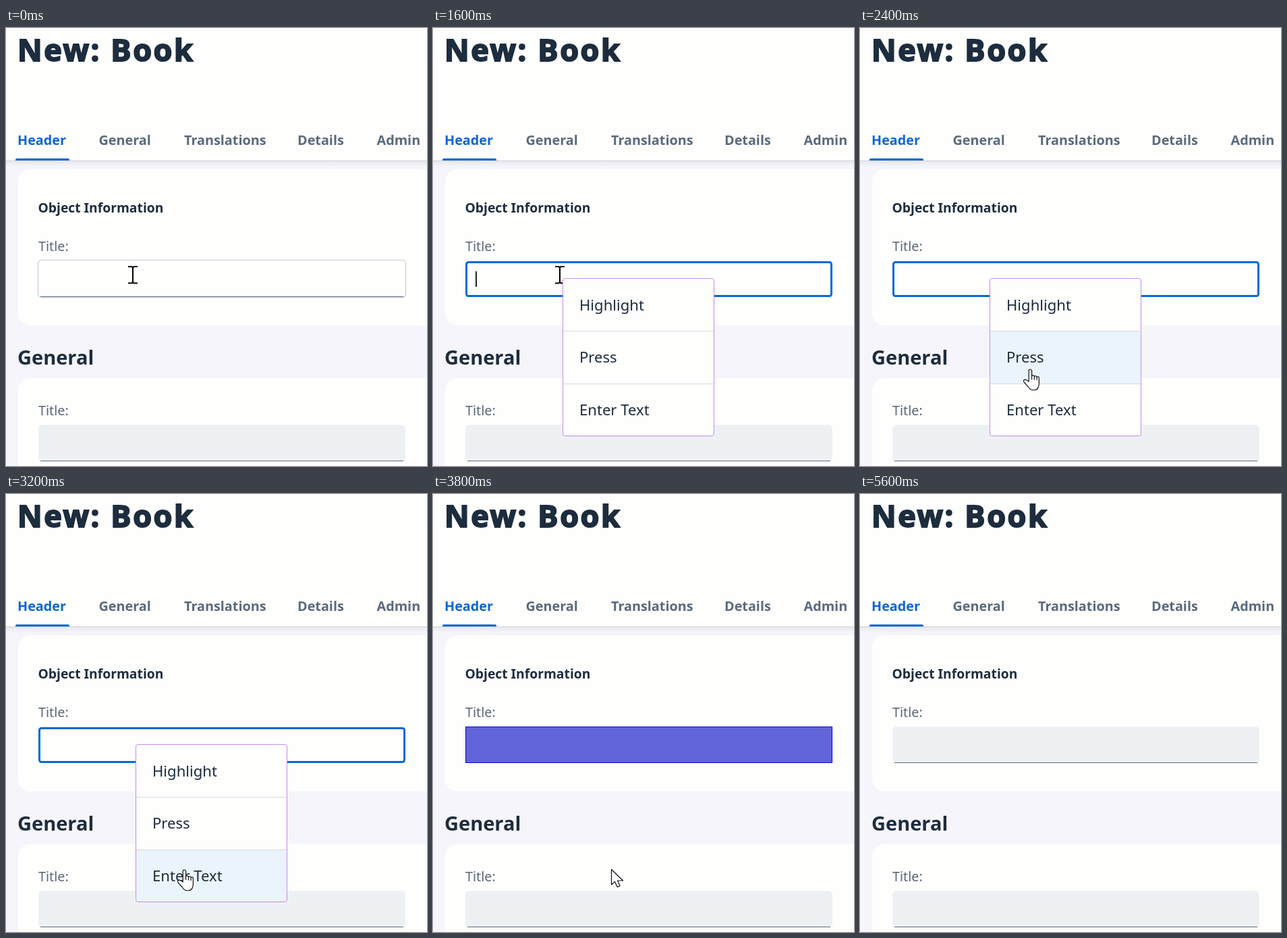
Recreate the animation shown at these times as an HTML page. Size 624 px wide and 648 px high, loop 6200 ms.

```html
<!DOCTYPE html>
<html lang="en">
<head>
<meta charset="utf-8">
<title>New: Book</title>
<style>
  html, body { margin: 0; width: 100%; height: 100%; overflow: hidden; background: #fefefd; }
  svg { display: block; width: 624px; height: 648px; }
  text { font-family: "Noto Sans", "Open Sans", sans-serif; fill: #1d2d3e; white-space: pre; }
  .title { font-size: 45px; font-weight: 700; letter-spacing: 2.6px; stroke: #1d2d3e; stroke-width: 2px; }
  .tab { font-size: 19.8px; font-weight: 700; fill: #5a6a7c; }
  .tab.on { fill: #0d65d8; }
  .h2 { font-size: 29px; font-weight: 700; }
  .h3 { font-size: 19.3px; font-weight: 700; }
  .label { font-size: 19.8px; fill: #5c6878; }
  .item { font-size: 22.1px; }
  .card { fill: #fefefd; }
  .cursor { fill: #fff; stroke: #111; stroke-width: 1.2px; stroke-linejoin: round; }
  [hidden] { display: none; }
</style>
</head>
<body>
<svg viewBox="0 0 624 648">
  <defs>
    <linearGradient id="shade" x2="0" y2="1">
      <stop stop-color="#e6e7ec"/>
      <stop offset="1" stop-color="#f5f5fb"/>
    </linearGradient>
    <g id="off">
      <path d="M0 54V6a6 6 0 0 1 6-6H538a6 6 0 0 1 6 6V49a5 5 0 0 1-5 5H5a5 5 0 0 1-5-5z" fill="#eef1f4"/>
      <path d="M3 53.5H541" stroke="#5b6b7c"/>
    </g>
    <g id="hover">
      <rect x="-.5" y="-.5" width="545" height="55" rx="5" fill="#fefefd" stroke="#d3d6da" stroke-width="1.6"/>
      <path d="M3 53.5H541" stroke="#566b82"/>
    </g>
    <rect id="focus" x="1.5" y="2.5" width="541" height="50" rx="3" fill="#fefefd" stroke="#0568dc" stroke-width="3"/>
    <rect id="faint" x=".5" y=".5" width="543" height="53" fill="#9c9de6" stroke="#0505c8"/>
    <rect id="mark" x=".5" y=".5" width="543" height="53" fill="#6264da" stroke="#0505c8"/>
    <path id="beam" d="M-7-12h5.5l1.5 1.5 1.5-1.5H7M0-11V11.5M-7 12.5h5.5l1.5-1.5 1.5 1.5H7" fill="none" stroke="#000" stroke-width="2"/>
    <g id="hand" class="cursor">
      <path d="M8.2 19V3.2a2.2 2.2 0 0 1 4.4 0V11c.2-1.7 3.7-1.6 3.8.6.4-1.3 3.6-1.1 3.7.9.6-1.2 3.3-.9 3.3 1.2V21.5c0 5-2 10-6 10H13.5c-3 0-4.6-2-6.2-4.7L1.2 20c-1.8-3 .9-4.8 3.4-3.2z"/>
      <path d="M12.6 11v5M16.4 12v4.5M20.1 13v4" fill="none"/>
    </g>
    <path id="arrow" class="cursor" d="M.5.5V23l5-4.6 3.7 8 3.9-1.7-3.5-7.7h8z"/>
  </defs>

  <rect width="624" height="648" fill="#fefefd"/>
  <text class="title" x="17" y="48.5">New: Book</text>
  <g id="tabs"></g>
  <rect y="196" width="624" height="452" fill="#f5f5fb"/>
  <rect y="196" width="624" height="9" fill="url(#shade)"/>
  <path d="M0 196.5H624" stroke="#cfd1d5"/>
  <path d="M14 196v-1a2 2 0 0 1 2-2H92a2 2 0 0 1 2 2v1z" fill="#0568d8"/>

  <rect class="card" x="18" y="209" width="640" height="231" rx="18"/>
  <text class="h3" x="47.5" y="273">Object Information</text>
  <text class="label" x="48" y="330">Title:</text>
  <use id="top" x="48" y="344"/>
  <rect id="caret" x="63" y="360" width="2" height="23" fill="#222"/>

  <text class="h2" x="17" y="498">General</text>
  <rect class="card" x="18" y="518" width="640" height="200" rx="18"/>
  <text class="label" x="48" y="573">Title:</text>
  <use id="low" x="48" y="587"/>

  <use id="under"/>
  <g id="menu">
    <rect x="192.5" y="370.5" width="224" height="233" rx="3.5" fill="#fefefd"/>
    <rect id="lit" x="193" width="223" height="77" fill="#eaf4fc"/>
    <path d="M193 448.5H416M193 526.5H416" stroke="#d7dadd"/>
    <rect x="192.5" y="370.5" width="224" height="233" rx="3.5" fill="none" stroke="#c48cec"/>
    <g id="items"></g>
  </g>
  <use id="over"/>
</svg>
<script>
  const LOOP = 6200;
  const $ = id => document.getElementById(id);
  const set = (el, attrs) => {
    for (const k in attrs) el.setAttribute(k, attrs[k]);
    return el;
  };
  const show = (el, on) => el.toggleAttribute("hidden", !on);

  function label(parent, text, cls, x, y) {
    const el = document.createElementNS("http://www.w3.org/2000/svg", "text");
    el.textContent = text;
    parent.append(set(el, { class: cls, x, y }));
  }

  const tabs = { Header: 17, General: 137.5, Translations: 264, Details: 432, Admin: 549.5 };
  Object.entries(tabs).forEach(([name, x], i) =>
    label($("tabs"), name, i ? "tab" : "tab on", x, 173));
  ["Highlight", "Press", "Enter Text"].forEach((name, i) =>
    label($("items"), name, "item", 217, 417.5 + i * 77.5));

  // start, upper field, lower field, cursor, x, y, hovered row (-1: none, null: menu closed)
  const steps = [
    [0, "hover", "off", "beam", 188, 365, null],
    [1600, "focus", "off", "beam", 188, 365, -1],
    [2200, "focus", "off", "hand", 222, 412, 0],
    [2400, "focus", "off", "hand", 242, 504, 1],
    [2600, "focus", "off", "hand", 241, 542, 2],
    [2800, "focus", "off", "hand", 254, 552, 2],
    [3000, "focus", "off", "hand", 254, 555, 2],
    [3600, "faint", "off", "arrow", 264, 555, null],
    [3800, "mark", "off", "arrow", 264, 555, null],
    [5200, "off", "off", "beam", 287, 559.5, null],
    [5400, "off", "hover", "beam", 287, 586.5, null],
    [5600, "off", "off", "", 0, 0, null]
  ];
  const blinks = [[1600, 2000], [2600, 3200]];

  function draw(t) {
    const [, top, low, cursor, x, y, row] = steps.findLast(s => s[0] <= t);
    const open = row !== null;
    set($("top"), { href: "#" + top });
    set($("low"), { href: "#" + low });
    show($("caret"), blinks.some(([a, b]) => t >= a && t < b));
    show($("menu"), open);
    show($("lit"), open && row >= 0);
    if (open) set($("lit"), { y: 371 + Math.max(row, 0) * 78, height: row === 2 ? 76 : 77 });

    // the menu covers a text cursor, but not the hand
    const beam = cursor === "beam";
    for (const [id, on] of [["under", beam], ["over", cursor && !beam]]) {
      show($(id), on);
      if (on) set($(id), { href: "#" + cursor, x, y });
    }
  }

  const start = performance.now();
  function tick() {
    draw((performance.now() - start) % LOOP);
    requestAnimationFrame(tick);
  }
  tick();
</script>
</body>
</html>
```
